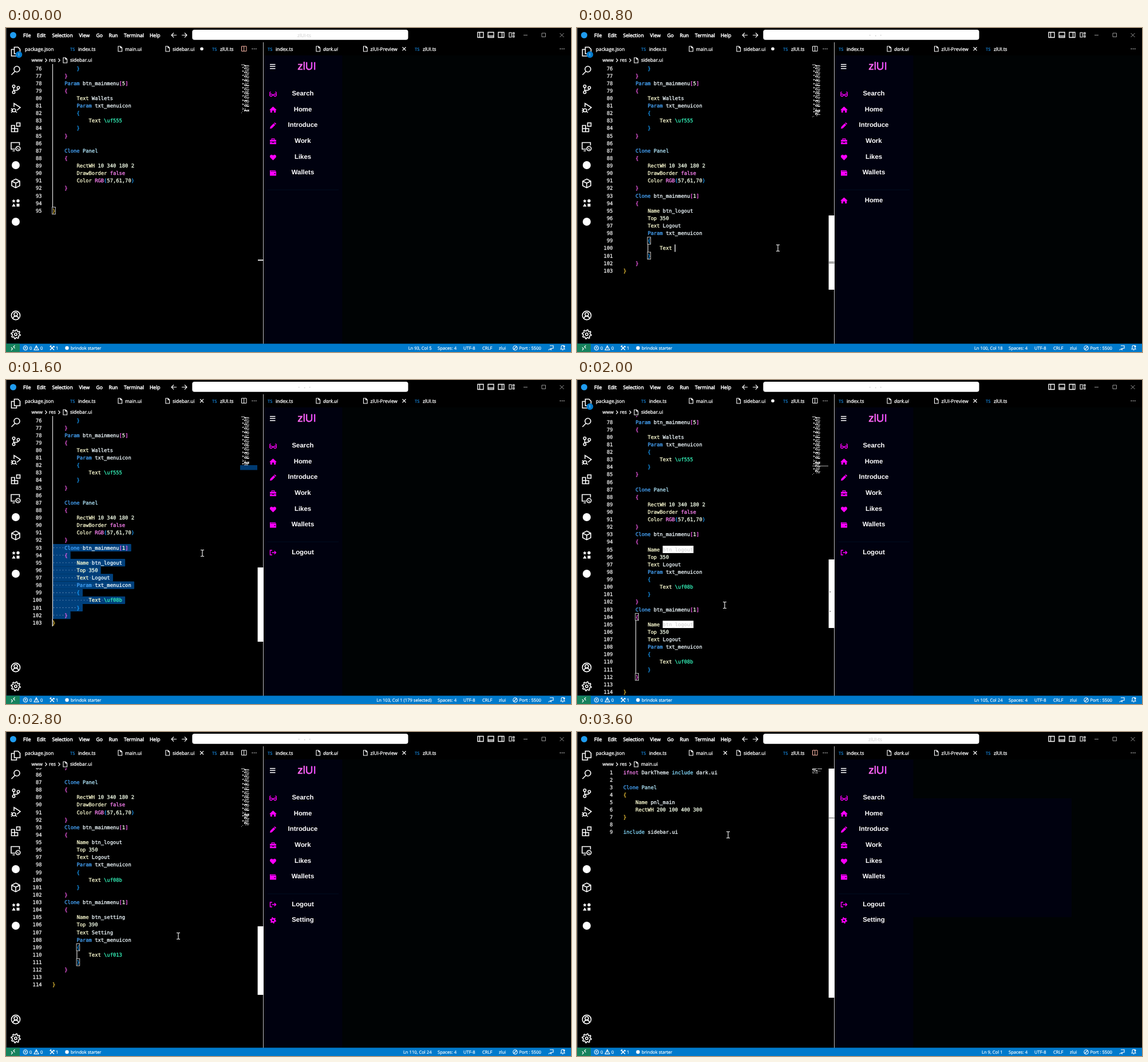
These frames come from a looping animation (987 by 567 pixels, 4 s). An HTML page:

```html
<!DOCTYPE html>
<html lang="en">
<head>
<meta charset="utf-8">
<title>UI editor demo</title>
<style>
  html, body { margin: 0; width: 100%; height: 100%; overflow: hidden; background: #000; }
  svg { display: block; }
  text { white-space: pre; fill: #fff; font-family: "Open Sans", "Noto Sans", sans-serif; text-rendering: geometricPrecision; }
  .ui { stroke: #fff; stroke-width: .3; }
  .small { stroke: #fff; stroke-width: .18; }
  .code { font: 8.8px "DejaVu Sans Mono", monospace; stroke-width: .3; }
  .menu { font: bold 11.4px "Liberation Sans", Arial, sans-serif; text-anchor: middle; }
  .line { fill: none; stroke: #fff; stroke-width: 1.6; }
  .solid { fill: #fff; }
</style>
</head>
<body>
<svg id="stage" width="987" height="567" viewBox="0 0 987 567">
  <defs>
    <clipPath id="editor"><rect x="32" y="63" width="418" height="489"/></clipPath>
    <linearGradient id="brand"><stop stop-color="#ff6cf0"/><stop offset="1" stop-color="#f04cff"/></linearGradient>
  </defs>
  <g id="frame"></g>
  <g id="live"></g>
</svg>
<script>
const STEP = 400, LOOP = 4000;
const ROW = 13.12, COL = 5.298, LEFT = 81;
const PINK = '#ff60f4', AZURE = '#179fff', GOLD = '#ffd23c', MAGENTA = '#ff00ff';

// Drawing helpers
const text = (x, y, s, size = 8.35, attrs = 'class="ui"') =>
  `<text x="${x}" y="${y}" font-size="${size}" ${attrs}>${s}</text>`;
const rect = (x, y, w, h, fill, attrs = '') =>
  `<rect x="${x}" y="${y}" width="${w}" height="${h}" fill="${fill}" ${attrs}/>`;
const circle = (x, y, r, attrs = 'class="line"') => `<circle cx="${x}" cy="${y}" r="${r}" ${attrs}/>`;
const path = (d, attrs = 'class="line"') => `<path d="${d}" ${attrs}/>`;
const thin = 'fill="none" stroke="#fff" stroke-width="1.1"';
const at = (x, y, body) => `<g transform="translate(${x} ${y})">${body}</g>`;
const cross = (x, y, r = 3) => path(`M${x - r} ${y - r}l${2 * r} ${2 * r}m0 ${-2 * r}l${-2 * r} ${2 * r}`, thin);
const fileIcon = (x, y) => path(`M${x - 3} ${y - 4.5}h4l2.6 2.6v6.4h-6.6zM${x + 1} ${y - 4.5}v2.6h2.6`, thin);
const dots = (x, y) => [-3.2, 0, 3.2].map(d => circle(x + d, y, .8, 'class="solid"')).join('');
const tsTab = (x, label) =>
  text(x, 39.6, 'TS', 7.6, 'style="fill:#1688e0;font-weight:600"') + text(x + 14, 40, label);
const fileTab = (x, label, attrs) => fileIcon(x, 36.5) + text(x + 9, 40, label, 8.35, attrs);

function gear(outer, inner, teeth) {
  const points = [];
  for (let i = 0; i < teeth * 4; i++) {
    const a = (i + .5) / (teeth * 4) * 2 * Math.PI, r = i % 4 < 2 ? outer : inner;
    points.push(`${(r * Math.cos(a)).toFixed(2)} ${(r * Math.sin(a)).toFixed(2)}`);
  }
  return `M${points.join('L')}Z`;
}

// Activity bar, each icon centred on its own origin
const activity = [
  [41, path('M-2.5-7.5h6.500l3.500 3.500v8h-10zM-3-3.500h-4.500v11.500h9v-3')],
  [74, circle(2, -2, 5) + path('M-1.500 2L-7.500 8')],
  [107, circle(-3.5, -5, 2.2) + circle(-3.5, 5.5, 2.2) + circle(4.5, -2.5, 2.2) + path('M-3.500-2.800v6M4.500 0c0 3-6 1-8 3.200')],
  [140, path('M-3-2v-6L8-1 2 4') + circle(-3, 4, 2.8) + path('M-8 1l2.500 1.500M-8.500 4.500h3M-8 8l2.500-2M2 8L-.5 6')],
  [174, path('M-7.500-3.500h5.500v5.500h5.500v5.500h-11zM-7.500 2h5.500v5.500M1.500-8h6v6h-6z')],
  [207, path('M-1 5h-7v-11.500h14.500v5M-5.500 8h4') + circle(4, 4, 3.8) + path('M2.500 4.500l1.500-1.500m0 3l1.500-1.500', thin)],
  [240, circle(0, 0, 7, 'class="solid"')],
  [272, path('M0-7.700L7-4V4L0 7.700-7 4V-4ZM-7-4L0-.500 7-4M0-.5V7.700')],
  [306, path('M-3.500-6.500l1 2 2.200.3-1.600 1.500.4 2.200-2-1-2 1 .4-2.200-1.600-1.500 2.200-.3zM-3.500 1l3.200 5.500h-6.400zM1.500 1.500h5v5h-5z', 'class="solid"') + circle(4, -3.5, 2.7, 'class="solid"')],
  [339, circle(0, 0, 7, 'class="solid"')],
  [503, circle(0, 0, 7.6) + circle(0, -2, 3) + path('M-5 5.500c1-5.500 9-5.500 10 0')],
  [536, path(gear(8, 5.8, 8)) + circle(0, 0, 2.2)],
];

// Menu icons of the preview
const fill = `fill="${MAGENTA}"`, outline = `fill="none" stroke="${MAGENTA}" stroke-width="1.4"`;
const glyphs = {
  glasses: path('M-5.500 1v-4l1.500-1M5.500 1v-4l-1.500-1M-1.500 1.500h3', outline) + circle(-3.5, 2, 2.1, outline) + circle(3.5, 2, 2.1, outline),
  home: path('M0-5.500L6.500.3H4.700V5H1.500V1.500h-3V5h-3.200V.3h-1.800z', fill),
  pencil: path('M-5.500 5.500l.8-3.500 5.700-5.700 2.700 2.700-5.700 5.700zM1.700-4.400l1.300-1.200 2.600 2.600-1.200 1.300z', fill),
  briefcase: path('M-5.500-2.500h11v3h-11zM-5.500 1.300h4v1h3v-1h4v3.700h-11z', fill) + path('M-2.200-2.500v-2h4.400v2', outline),
  heart: path('M0 5.500L-4.800.7C-7-2-3.500-6.500 0-2.800 3.500-6.500 7-2 4.800.7z', fill),
  wallet: path('M-5.500-4.500h10v1.200h-9v.8h10v7.500h-11zM2.300.3v1.700h1.700v-1.700z', fill + ' fill-rule="evenodd"'),
  logout: path('M-1.500-4h-3.500v8h3.500M-2 0h6.500M2.300-2.700L5 0 2.300 2.700', outline),
  gear: path(gear(5.6, 4, 6) + 'M1.700 0a1.700 1.700 0 1 0-3.400 0a1.700 1.700 0 1 0 3.400 0z', fill + ' fill-rule="evenodd"'),
};
const menuItem = (y, label, icon) =>
  at(466.5, y + 1, glyphs[icon]) + `<text class="menu" x="518.5" y="${y + 3.7}">${label}</text>`;

// Document being edited
const pad = (n, s) => ' '.repeat(n) + s;
const group = (n, head, body) => [pad(n, head), pad(n, '{'), ...body, pad(n, '}')];
const icon = code => group(8, 'Param txt_menuicon', [pad(12, 'Text ' + code)]);
const button = (i, label, code) => group(4, `Param btn_mainmenu[${i}]`, [pad(8, 'Text ' + label), ...icon(code)]);
const clone = body => group(4, 'Clone btn_mainmenu[1]', body);
const fields = (...list) => list.map(s => pad(8, s));

const labels = ['Search', 'Home', 'Introduce', 'Work', 'Likes', 'Wallets'];
const base = [
  'Clone Panel', '{', ...fields('Name pnl_sidebar', 'RectWH 0 0 200 600'), '',
  ...['Menu', 'Title', 'Theme', 'Button'].flatMap((s, i) => button(i, s, '\\uf0c9')),
  ...labels.flatMap((s, i) => button(i, s, '\\uf555')), '',
  ...group(4, 'Clone Panel', fields('RectWH 10 340 180 2', 'DrawBorder false', 'Color RGB(57,61,70)')),
];
const logoutHead = fields('Name btn_logout', 'Top 350');
const logout = clone([...logoutHead, ...fields('Text Logout'), ...icon('\\uf08b')]);
const setting = code => clone([...fields('Name btn_setting', 'Top 390', 'Text Setting'), ...icon(code)]);
const sidebar = (...tail) => [...base, ...tail.flat(), '}'];
const mainFile = size => [
  'ifnot DarkTheme include dark.ui', '',
  ...group(0, 'Clone Panel', [pad(4, 'Name pnl_main'), pad(4, 'RectWH ' + size)]), '',
  'include sidebar.ui',
];

const home = ['Home', 'home'], exit = ['Logout', 'logout'], gearItem = ['Setting', 'gear'];
// match: first line, last line, column of the highlighted bracket pair
const scenes = [
  { lines: sidebar('', ''), status: 'Ln 93, Col 5', dirty: true, match: [2, 95, 0], extra: [], crisp: true, ticks: [406] },
  { lines: sidebar(clone(logoutHead)), status: 'Ln 96, Col 16', match: [94, 97, 4], extra: [home], bar: [337, 472], ticks: [408.5, 410.8], mouse: [189, 333] },
  { lines: sidebar(clone([...logoutHead, ...fields('Text Logout'), ...icon('')])), status: 'Ln 100, Col 18', dirty: true, match: [99, 101, 8], caret: [100, 17], extra: [home], bar: [328, 458], ticks: [409.5, 411.5], mouse: [351, 385] },
  { lines: sidebar(logout), status: 'Ln 100, Col 24', match: [99, 101, 8], caret: [100, 23], extra: [exit], bar: [328, 458], ticks: [409.5, 411.5], mouse: [351, 385] },
  { lines: sidebar(logout), status: 'Ln 103, Col 1 (179 selected)', match: [2, 103, 0], caret: [103, 0], selected: [93, 102], extra: [exit], bar: [328, 458], mouse: [343, 303] },
  { lines: sidebar(logout, logout, ''), scroll: 23.2, status: 'Ln 105, Col 24', dirty: true, match: [104, 112, 4], found: [95, 105], extra: [exit], bar: [314, 434], specks: [370, 404], mouse: [258, 394] },
  { lines: sidebar(logout, setting('\\uf08b'), ''), scroll: 23.2, status: 'Ln 107, Col 21', match: [104, 112, 4], extra: [exit, ['Setting', 'logout']], bar: [314, 434], mouse: [258, 394] },
  { lines: sidebar(logout, setting('\\uf013'), ''), scroll: 126.7, status: 'Ln 110, Col 24', match: [109, 111, 8], extra: [exit, gearItem], bar: [340, 460], mouse: [301, 357] },
  { main: true, lines: mainFile('200 100'), status: 'Ln 6, Col 19', dirty: true, extra: [exit, gearItem], bar: [64, 465], ticks: [150.5], mouse: [264, 180], crisp: true },
  { main: true, lines: mainFile('200 100 400 300'), status: 'Ln 9, Col 1', extra: [exit, gearItem], bar: [64, 465], ticks: [150.5], mouse: [264, 180], panel: true, crisp: true },
];

const tokenColors = [
  [/^(Param|Clone)$/, '#48a8ff'], [/^(false|RGB|ifnot)$/, '#ff84f6'], [/^\\u/, '#34f0b8'],
  [/^include$/, '#86dcff'], [/^(Text|RectWH|DrawBorder|Color|Name|Top)$/, '#ffffd4'],
  [/^Panel$/, '#b4eaff'], [/^[[\]]$/, PINK], [/^[()]$/, AZURE], [/^\d/, '#f4ffea'],
];
function colorOf(token, indent) {
  if (/[{}]/.test(token)) return [GOLD, PINK, AZURE][indent / 4];
  const rule = tokenColors.find(([pattern]) => pattern.test(token));
  return rule ? rule[1] : '#f0faff';
}
function codeLine(line, y) {
  const indent = line.search(/\S/);
  const spans = (line.match(/\s+|[[\]{}()]|[^\s[\]{}()]+/g) || []).map(token => {
    const c = colorOf(token, indent);
    return `<tspan fill="${c}" stroke="${c}">${token}</tspan>`;
  });
  return `<text class="code" x="${LEFT}" y="${y}">${spans.join('')}</text>`;
}

function editor(s) {
  const yOf = n => 70.4 + (n - (s.main ? 1 : 76)) * ROW - (s.scroll || 0);
  const xOf = c => LEFT + c * COL;
  let out = '';
  s.lines.forEach((line, i) => {
    const n = i + 1, y = yOf(n);
    if (y < 55 || y > 560) return;
    if (s.selected && n >= s.selected[0] && n <= s.selected[1]) {
      out += rect(LEFT, y - ROW / 2, (line.length + 1) * COL, ROW + .1, '#00407c', 'rx="1"');
      [...line].forEach((ch, c) => {
        if (ch === ' ') out += circle(xOf(c + .5), y, .55, 'fill="#a8c4e0"');
      });
    }
    out += codeLine(line, y + 3.1);
    out += text(62.5, y + 3.1, n, 8.8, 'class="code" text-anchor="end" stroke="#eee" style="fill:#eee"');
    if (s.found && s.found.includes(n))
      out += rect(xOf(13) - .2, y - 6.4, 53.8, 12.8, '#fff') +
        text(xOf(13), y + 3.1, 'btn_logout', 8.8, 'class="code" style="fill:#ccc"');
  });
  if (s.match) {
    const [from, to, col] = s.match, x = xOf(col);
    out += path(`M${x + .5} ${yOf(from) + 6.5}V${yOf(to) - 6.5}`, 'stroke="#eee" stroke-width="1.1"');
    if (!s.selected)
      for (const n of [from, to])
        out += rect(x - .3, yOf(n) - 6.2, 5.6, 12.4, 'none', 'stroke="#ddd" stroke-width=".9"');
  }
  if (s.caret) out += rect(xOf(s.caret[1]) - .4, yOf(s.caret[0]) - 6.5, 1.3, 13, '#fff');
  return out;
}

function minimap(s) {
  let d = '';
  s.lines.forEach((line, i) => {
    for (const word of line.matchAll(/\S+/g))
      d += `M${(411 + word.index * .56).toFixed(1)} ${(64 + i * .9).toFixed(1)}h${(word[0].length * .5).toFixed(1)}`;
  });
  let out = path(d, 'stroke="#fff" stroke-width=".8" shape-rendering="crispEdges"');
  if (s.selected) out += rect(409, 149, 30, 8.5, '#003a70');
  if (s.found) out += rect(411, 150, 28, 1, '#aaa');
  return out;
}

function scrollbar(s) {
  let out = '';
  if (s.bar) out += rect(439.6, s.bar[0], 10.4, s.bar[1] - s.bar[0], '#fff');
  for (const y of s.ticks || []) out += rect(440, y - .6, 9.6, s.bar ? 1 : 1.8, s.bar ? '#555' : '#fff');
  for (const y of s.specks || []) out += rect(441.5, y, 1.5, 1.5, '#555');
  return out;
}

function live(s) {
  const name = s.main ? 'main.ui' : 'sidebar.ui';
  const markX = s.main ? 259 : 342;
  let out = s.crisp
    ? text(521, 15.5, 'zlUI-ts', 8.35, 'text-anchor="middle" style="fill:#c9c9c9"')
    : [511, 521, 530].map((x, i) => rect(x, 12 + i % 2, 1.4, 1.2, '#bbb')).join('');
  out += s.dirty ? circle(markX, 36.5, 2.8, 'class="solid"') : cross(markX, 36.5);
  out += path('M411.500 32h8.500v8.500h-8.500zM415.700 32v8.500', `fill="none" stroke="${s.crisp ? '#ffb8a8' : '#fff'}"`);
  out += text(112, 59.4, name);
  out += `<g clip-path="url(#editor)">${editor(s)}${minimap(s)}${scrollbar(s)}</g>`;
  if (s.panel) out += rect(587, 116, 277, 208, '#00010f');
  s.extra.forEach(([label, glyph], i) => { out += menuItem(301 + i * 27.6, label, glyph); });
  if (s.dirty)
    out += circle(22.5, 46.5, 5.8, 'fill="#007acc"') + text(22.5, 49, '1', 6.5, 'text-anchor="middle"');
  if (s.mouse) out += at(...s.mouse, path('M-3-5.500h2.200l.8.8.8-.8H3M0-4.700V4.700M-3 5.500h2.200l.8-.8.8.8H3', thin));
  return out + text(743.5, 563, s.status, 7.64, 'class="small" text-anchor="end"');
}

function frame() {
  const menus = { File: 30, Edit: 54, Selection: 80.5, View: 127.5, Go: 157.5, Run: 179.5, Terminal: 206, Help: 251 };
  let out = rect(0, 0, 987, 567, '#000') + rect(450, 48, 537, 505, '#000304') + rect(450, 48, 137.5, 505, '#00010f');
  out += rect(0, 0, 1, 553, '#555') + rect(449, 25, 1, 528, '#bbb');
  // title bar
  out += circle(12.5, 12.5, 5.5, 'fill="#1f9cf0"');
  for (const [label, x] of Object.entries(menus))
    out += text(x, 15.6, label, 8.6, 'stroke="#fff" stroke-width=".5"');
  out += path('M298 12.500h-9m4-4l-4 4 4 4M307 12.500h9m-4-4l4 4-4 4', thin);
  out += rect(325.3, 3, 377.2, 17.8, '#fff', 'rx="4"');
  for (const [x, split] of [[829, 'M-1.500-4.500v9'], [847, 'M-5 2h10'], [865, 'M1.500-4.500v9']])
    out += at(x, 12, path('M-5-4.500h10v9h-10z' + split, 'fill="none" stroke="#fff" stroke-width="1.3"'));
  out += at(883.5, 12, path('M-4.500-4h4v8h-4zM2-4h2.500v2.800h-2.500zM2 1.200h2.500v2.800h-2.500z', thin));
  out += path('M904 12.500h7M936 9h6.500v6.500h-6.500zM967.500 9l7 7m0-7l-7 7', 'fill="none" stroke="#bbb" stroke-width=".8"');
  // tabs and breadcrumb
  out += text(33, 40, 'package.json') + tsTab(112, 'index.ts') + fileTab(199, 'main.ui') + fileTab(282, 'sidebar.ui');
  out += tsTab(360, 'zlUI.ts') + dots(433.5, 36.5) + tsTab(457, 'index.ts');
  out += fileTab(545, 'dark.ui', 'class="ui" font-style="italic"') + fileTab(627.5, 'zlUI-Preview');
  out += cross(695.5, 36.5) + tsTab(714, 'zlUI.ts') + dots(971.5, 36.5);
  out += text(44.5, 59.4, 'www') + text(75, 59.4, 'res') + fileIcon(103, 56.5);
  out += path('M68.500 53.500l2.800 3-2.800 3M91.500 53.500l2.800 3-2.800 3', thin);
  for (const [y, body] of activity) out += at(17, y, body);
  // preview
  out += path('M461 63.700h9.500M461 67.300h9.500M461 70.900h9.500', 'stroke="#fff" stroke-width="1.5"');
  out += text(525.5, 72.5, 'zlUI', 18.9, 'text-anchor="middle" style="font-family:\'Liberation Sans\',Arial,sans-serif;fill:url(#brand);stroke:url(#brand);stroke-width:.6"');
  out += rect(457, 282.5, 124, 1.4, '#000a1c');
  labels.forEach((label, i) => { out += menuItem(114.5 + i * 27.62, label, Object.keys(glyphs)[i]); });
  // status bar
  out += rect(0, 552.5, 987, 14.5, '#007acc') + rect(0, 552.5, 24, 14.5, '#16825d');
  out += path('M9 559l2.500 2.500L9 564M15.500 555.500L13 558l2.500 2.500', thin);
  out += circle(34, 560, 3.7, thin) + cross(34, 560, 1.6);
  out += path('M53 556l4 7.500h-8zM53 558.500v2.500M53 562v.8', thin);
  out += path('M77 556.500l7 7M84 556.500l-7 7M76.500 558l2.500-2.500M82.500 557l2.500 1.500', 'fill="none" stroke="#fff" stroke-width="1.5"');
  out += circle(106.5, 560, 3.2, 'class="solid"') + circle(889.5, 560, 3.7, thin) + path('M887 562.500l5-5', thin);
  const labelsBelow = [[41, '0'], [60, '0'], [87, '1'], [113, 'brindok starter'], [754, 'Spaces: 4'],
    [799, 'UTF-8'], [832, 'CRLF'], [861, 'zlui'], [896.5, 'Port : 5500']];
  for (const [x, label] of labelsBelow) out += text(x, 563, label, 7.64, 'class="small"');
  out += path('M950 556h6v4.500h-2.500l-2 2v-2M948 564c.5-3 4-3 4.500 0', thin);
  out += path('M969 562h7l-1-1.500v-2.500a2.500 2.500 0 0 0-5 0v2.500zM971.500 563.500h2', thin) + circle(975, 557, 1.6, 'class="solid"');
  return out;
}

const liveGroup = document.getElementById('live');
document.getElementById('frame').innerHTML = frame();
const start = performance.now();
let shown = -1;
function tick() {
  const index = Math.floor((performance.now() - start) % LOOP / STEP);
  if (index !== shown) {
    liveGroup.innerHTML = live(scenes[index]);
    shown = index;
  }
  requestAnimationFrame(tick);
}
tick();
</script>
</body>
</html>
```
